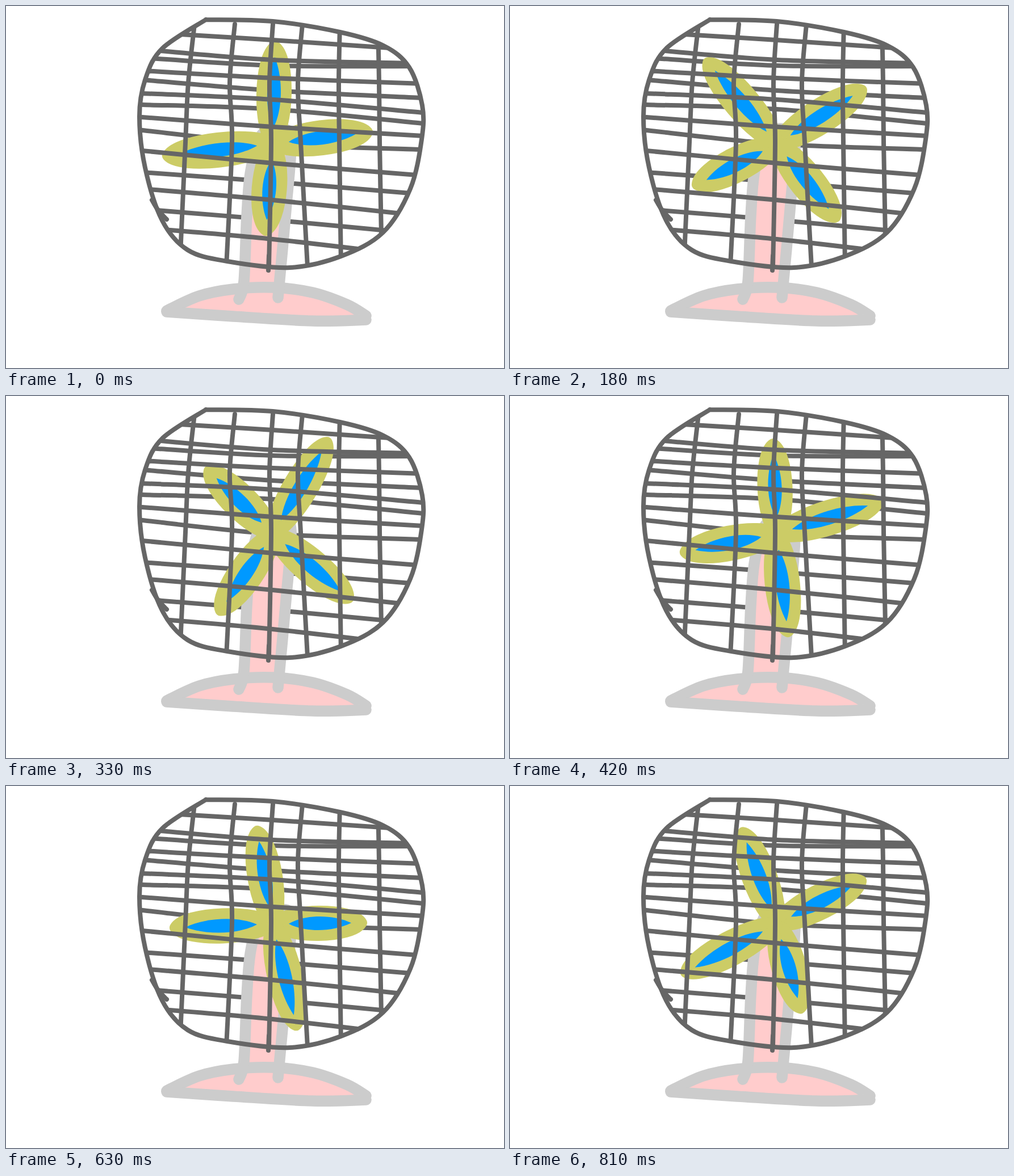
An HTML page that plays this animation: 877 px wide and 638 px high, repeating every 0.84 s.

```html
<!DOCTYPE html>
<html lang="en">
<head>
<meta charset="utf-8">
<title>Desk fan</title>
<style>
  html, body { margin: 0; width: 100%; height: 100%; overflow: hidden; background: #fff; }
  svg { display: block; width: 877px; height: 638px; }
  path { fill: none; stroke-linecap: round; stroke-linejoin: round; }
  #back path, #front path, #rim path { stroke: #666; stroke-width: 8; }
  #stand path { stroke: #ccc; stroke-width: 19.5; }
  #stand .fill { fill: #fcc; stroke: none; }
  #leaves path { fill: #cc6; stroke: #cc6; stroke-width: 20; }
  #cores path { fill: #09f; }
</style>
</head>
<body>
<svg viewBox="0 0 877 638">
  <clipPath id="inside"></clipPath>
  <g id="back" clip-path="url(#inside)"></g>
  <g id="stand"></g>
  <g id="leaves"></g>
  <g id="cores"></g>
  <g id="front" clip-path="url(#inside)"></g>
  <g id="rim"></g>
</svg>
<script>
const STEP = 30, FRAMES = 28, HUB = [470, 243];
const LEAF = 31, CORE = 12, ROUND = 10, GAP = 28;

function addPath(id, d = '', cls = '') {
  const p = document.createElementNS('http://www.w3.org/2000/svg', 'path');
  p.setAttribute('d', d);
  if (cls) p.setAttribute('class', cls);
  document.getElementById(id).append(p);
  return p;
}

const points = text => text.split(' ').map(s => s.split(',').map(Number));

// Smooth path through a list of points
function spline(p) {
  let d = 'M' + p[0];
  for (let i = 0; i < p.length - 1; i++) {
    const a = p[i - 1] || p[i], b = p[i], c = p[i + 1], e = p[i + 2] || c;
    const c1 = b.map((v, j) => v + (c[j] - a[j]) / 6);
    const c2 = c.map((v, j) => v - (e[j] - b[j]) / 6);
    d += `C${c1} ${c2} ${c}`;
  }
  return d;
}
const curve = text => spline(points(text));

// Rim of the guard, which also trims the wires
const rim = curve('352,24 470,27 588,46 665,70 710,108 733,175 732,235 712,322 664,399 ' +
  '590,441 500,461 390,450 320,430 275,378 245,285 235,195 245,130 275,75 352,24');
addPath('inside', rim);
addPath('rim', rim);
addPath('rim', curve('257,342 268,360 283,376'));

// Cross wires: height at the left, middle and right; every other one runs behind
points('46,60,78 76,95,101 91,105,106 114,127,137 130,149,162 154,165,188 174,182,207 ' +
  '196,213,229 219,243,253 255,277,299 293,310,332 322,342,370 358,377,402 391,411,442')
  .forEach(([l, m, r], i) =>
    addPath(i && i % 2 === 0 ? 'back' : 'front', spline([[240, l], [470, m], [735, r]])));

// Upright wires: x at four heights
points('332,321,316,306 403,394,398,388 470,464,467,463 522,514,519,531 588,586,587,590 655,657,658,662')
  .forEach(xs => addPath('front', spline(xs.map((x, i) => [x, [32, 135, 240, 460][i]]))));
addPath('rim', 'M463 440L462 466');

// Stand
const baseTop = curve('283,537 340,511 400,499 470,496 540,505 600,526 634,546');
const baseLow = curve('634,553 540,555 400,547 283,539');
const pole = curve('410,517 419,485 424,370 431,290 450,227 484,217 502,237 493,360 479,514');
addPath('stand', pole, 'fill');
addPath('stand', baseTop + baseLow.replace('M', 'L'), 'fill');
[baseTop, baseLow, pole].forEach(d => addPath('stand', d));

// Each pose: frame, quarter turns made, tips of the top, right, bottom and left blade
const poses = [];
const wrap = a => a - 2 * Math.PI * Math.round(a / (2 * Math.PI));

function pose(frame, quarter, tips) {
  const list = [0, 1, 2, 3].map(k => {
    const slot = k + quarter, rest = slot * Math.PI / 2;
    const [dx, dy] = points(tips)[slot % 4].map((v, j) => v - HUB[j]);
    return [rest + wrap(Math.atan2(dx, -dy) - rest), Math.hypot(dx, dy)];
  });
  poses.push({ frame, list });
}

const start = '474,62 646,221 457,405 275,265';
pose(0, 0, start);
pose(4, 0, '559,78 634,312 376,382 287,172');
pose(8, 1, '430,49 655,233 500,412 303,238');
pose(14, 2, '463,75 657,185 490,425 299,277');
pose(17, 2, '578,114 642,331 364,392 325,156');
pose(21, 3, '441,70 636,241 513,431 288,250');
pose(27, 4, '407,73 627,163 514,401 301,333');
pose(FRAMES, 4, start);

const leaves = poses[0].list.map(() => addPath('leaves'));
const cores = leaves.map(() => addPath('cores'));

// Pointed oval along a direction from the hub
function oval(a, from, to, half, near, far) {
  const at = (along, side) => [
    HUB[0] + Math.sin(a) * along + Math.cos(a) * side,
    HUB[1] - Math.cos(a) * along + Math.sin(a) * side
  ].map(v => +v.toFixed(2));
  const mix = u => from + (to - from) * u, bulge = half * 4 / 3;
  return `M${at(from, 0)}C${at(mix(near), -bulge)} ${at(mix(far), -bulge)} ${at(to, 0)}` +
         `C${at(mix(far), bulge)} ${at(mix(near), bulge)} ${at(from, 0)}Z`;
}

let shown = -1;
function tick() {
  const frame = Math.floor(performance.now() / STEP) % FRAMES;
  if (frame !== shown) {
    shown = frame;
    const i = poses.findIndex(p => p.frame > frame);
    const from = poses[i - 1], to = poses[i];
    const u = (frame - from.frame) / (to.frame - from.frame);
    leaves.forEach((leaf, k) => {
      const [a, len] = from.list[k].map((v, j) => v + (to.list[k][j] - v) * u);
      leaf.setAttribute('d', oval(a, 0, len - ROUND, LEAF - ROUND, .14, .9));
      cores[k].setAttribute('d', oval(a, GAP, len - GAP, CORE, .25, .7));
    });
  }
  requestAnimationFrame(tick);
}
tick();
</script>
</body>
</html>
```
